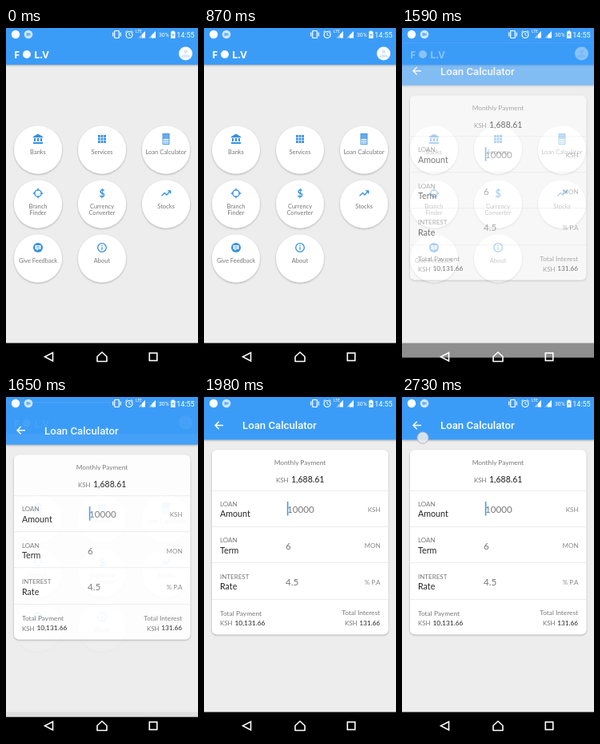
These frames come from a looping animation (240 by 427 pixels, 2.76 s). An HTML page:

```html
<!DOCTYPE html>
<html lang="en">
<head>
<meta charset="utf-8">
<title>Loan calculator</title>
<style>
html, body { margin: 0; width: 100%; height: 100%; overflow: hidden; background: #000; }
svg { display: block; width: 100%; height: 100%; font-family: Lato, "Open Sans", sans-serif; }
.line { fill: none; stroke: #3590e0; stroke-width: 1.3; }
.thin { fill: none; stroke: #fff; stroke-width: 1; }
.rule { stroke: #ececec; stroke-width: 1; }
</style>
</head>
<body>
<svg viewBox="0 0 240 427">
  <defs>
    <filter id="shadow" x="-10%" y="-10%" width="120%" height="125%">
      <feDropShadow dx="0" dy="1" stdDeviation=".8" flood-opacity=".3"/>
    </filter>
    <g id="page">
      <rect width="240" height="427" fill="#ededed"/>
      <rect y="394.500" width="240" height="33"/>
    </g>
  </defs>

  <g id="home">
    <use href="#page"/>
    <rect width="240" height="46" fill="#3a9cf8" filter="url(#shadow)"/>
    <g fill="#fff" font-size="13" font-weight="700" font-family="'Open Sans', sans-serif">
      <text x="10" y="37.500">F</text>
      <circle cx="26" cy="33" r="5"/>
      <text x="35" y="37.500">L.V</text>
    </g>
    <circle cx="224.500" cy="32" r="8.500" fill="#fff"/>
    <g fill="#dce8f6">
      <circle cx="224.500" cy="29.500" r="2.500"/>
      <path d="M219 37q0-4 5.500-4t5.500 4z"/>
    </g>
  </g>

  <g id="loan">
    <use href="#page"/>
    <rect width="240" height="53.500" fill="#3a9cf8" filter="url(#shadow)"/>
    <path class="thin" d="M24 35.500H14m4.700-4.700L14 35.500l4.700 4.700" style="stroke-width:1.5"/>
    <rect x="10" y="66.300" width="220.300" height="231" rx="6" fill="#fff" filter="url(#shadow)"/>
    <path class="rule" d="M10 117.500h220M10 162.500h220M10 207.500h220M10 253.500h220"/>
  </g>

  <g id="status" fill="#fff">
    <circle cx="12" cy="8" r="5.200"/>
    <circle cx="28" cy="8" r="5.300" opacity=".75"/>
    <path d="M25.500 6.300h3v1l2-1v3.500l-2-1v1h-3z" fill="#64aff5"/>
    <rect class="thin" x="135.700" y="3.500" width="5.600" height="9" rx=".8" style="stroke-width:1.2"/>
    <path class="thin" d="M133.700 5.500v5M143.300 5.500v5" style="stroke-width:1.2"/>
    <circle class="thin" cx="154" cy="8.500" r="4" style="stroke-width:1.2"/>
    <path class="thin" d="M154 6v2.700l1.800 1M149.300 5.300l2.300-2M158.700 5.300l-2.300-2"/>
    <path d="M165.500 12.500h8.500V4z" opacity=".55"/>
    <path d="M178.500 12.500h8.500V4z" opacity=".55"/>
    <path d="M170 12.500h4V4l-4 4zM182 12.500h5V4l-5 5z"/>
    <path d="M206 4.500h1.500v-1h2.500v1h1.500v8.500h-5.500z"/>
    <path d="M209.500 6l-2 3h1.300l-.6 2.500 2.100-3.300H209z" fill="#3a9cf8"/>
  </g>

  <g class="thin" style="stroke-width:1.6">
    <path d="M58.500 406.500v10.500l-10-5.250z"/>
    <path d="M114 411.500l6-5.500 6 5.500v6h-12z" stroke-linejoin="round"/>
    <rect x="179.300" y="407" width="9.500" height="9.500"/>
  </g>
  <circle id="touch" r="7.200" stroke="#a2a2a2" stroke-width=".7"/>
</svg>
<script>
const $ = id => document.getElementById(id);
const home = $('home'), loan = $('loan'), touch = $('touch');
const add = (parent, markup) => parent.insertAdjacentHTML('beforeend', markup);
const roboto = 'font-family="Roboto, sans-serif"';

// Vertical position is the middle of the capital letters.
function label(parent, text, x, middle, size, fill, anchor = 'start', extra = '') {
  add(parent, `<text x="${x}" y="${middle + size * 0.36}" font-size="${size}" fill="${fill}" text-anchor="${anchor}" ${extra}>${text}</text>`);
}

let dots = '';
for (let i = 0; i < 9; i++)
  dots += `<rect x="${-5 + i % 3 * 3.6}" y="${-5 + (i / 3 | 0) * 3.6}" width="2.8" height="2.8"/>`;

const items = [
  ['Banks', '<path d="M-6-3L0-6.500 6-3v1.200H-6zM-5-1h2v4h-2zM-1-1h2v4h-2zM3-1h2v4H3zM-6 4H6v2H-6z"/>'],
  ['Services', dots],
  ['Loan Calculator', '<rect class="line" x="-4" y="-6.500" width="8" height="13" style="stroke-width:.9"/><path d="M-4-6.500h8V0h-8z" opacity=".75"/><path class="line" d="M-2.700 2h6M-2.700 4.500h6" stroke-dasharray="1.300 .9"/>'],
  ['Branch|Finder', '<circle class="line" r="4.200"/><path class="line" d="M0-6.300v3M0 6.300v-3M-6.300 0h3M6.300 0h-3"/>'],
  ['Currency|Converter', '<text y="4.500" font-size="12.500" font-weight="700" text-anchor="middle">$</text>'],
  ['Stocks', '<path class="line" d="M-5.500 3.300l3.800-3.800 2.500 2.500L5.300-2.800M2-3.200h3.600V.4"/>'],
  ['Give Feedback', '<circle r="6"/><path d="M-3.500-3h7v5h-3L-1.500 4V2h-2z" fill="#fff"/><path d="M-2-1.500h4M-2 .5h4" stroke="#3590e0" stroke-width=".8"/>'],
  ['About', '<circle class="line" r="5.300"/><path class="line" d="M0-.7v3.500M0-3v1.300"/>']
];
items.forEach(([name, icon], i) => {
  const x = 40 + i % 3 * 80, y = 152.5 + (i / 3 | 0) * 68;
  add(home, `<circle cx="${x}" cy="${y}" r="30" fill="#fff" filter="url(#shadow)"/><g transform="translate(${x} ${y - 13.5})" fill="#3590e0">${icon}</g>`);
  name.split('|').forEach((line, row) => label(home, line, x, y + 2.5 + row * 8.5, 7.5, '#777', 'middle'));
});

label(loan, 'Loan Calculator', 48, 35.7, 13.2, '#fff', 'start', roboto + ' font-weight="500"');
label(loan, 'Monthly Payment', 120, 82, 8.3, '#777', 'middle');
label(loan, 'KSH', 90, 104, 7.9, '#777');
label(loan, '1,688.61', 109, 103.3, 10.5, '#222');
[['LOAN', 'Amount', '10000', 'KSH'], ['LOAN', 'Term', '6', 'MON'], ['INTEREST', 'Rate', '4.5', '% P.A']]
  .forEach(([kind, name, value, unit], i) => {
    const y = 141 + i * 45.5;
    label(loan, kind, 20, y - 7, 8, '#777');
    label(loan, name, 20, y + 5.5, 10.7, '#222');
    label(loan, value, i ? 102 : 104, y, 11.6, '#777');
    label(loan, unit, 220.5, y, 8, '#888', 'end');
  });
add(loan, '<rect x="103.800" y="131" width="1.600" height="17.500" fill="#3a9cf8"/>');
label(loan, 'Total Payment', 20, 270.5, 8.4, '#777');
label(loan, 'Total Interest', 220, 270.5, 8.3, '#777', 'end');
label(loan, 'KSH', 20, 283.5, 7.9, '#777');
label(loan, '10,131.66', 38.5, 283, 8.4, '#222');
label(loan, 'KSH', 176, 283.5, 7.9, '#777');
label(loan, '131.66', 220, 283, 8.2, '#222', 'end');

label($('status'), 'LTE', 162, 4.5, 5, '#fff', 'start', roboto);
label($('status'), '30%', 191, 8.5, 6.8, '#fff', 'start', roboto);
label($('status'), '14:55', 213.2, 8.5, 9, '#fff', 'start', roboto);

const LOOP = 2760, OPEN = 1550;
const taps = [
  { from: 1140, to: 1350, x: 207, y: 156, fill: 'rgba(255,255,255,.6)' },
  { from: 2670, to: LOOP, x: 26, y: 51, fill: 'rgba(232,234,238,.88)' }
];
const decelerate = (t, power) => 1 - (1 - Math.min(1, Math.max(0, t))) ** power;

function draw(t) {
  const age = t - OPEN;
  loan.setAttribute('opacity', decelerate(age / 200, 4));
  loan.setAttribute('transform', `translate(0 ${34 * (1 - decelerate(age / 350, 5))})`);
  const tap = taps.find(p => t >= p.from && t < p.to);
  touch.style.display = tap ? '' : 'none';
  if (tap) {
    touch.setAttribute('transform', `translate(${tap.x} ${tap.y})`);
    touch.setAttribute('fill', tap.fill);
  }
}

const start = performance.now();
function tick() {
  draw((performance.now() - start) % LOOP);
  requestAnimationFrame(tick);
}
tick();
</script>
</body>
</html>
```
